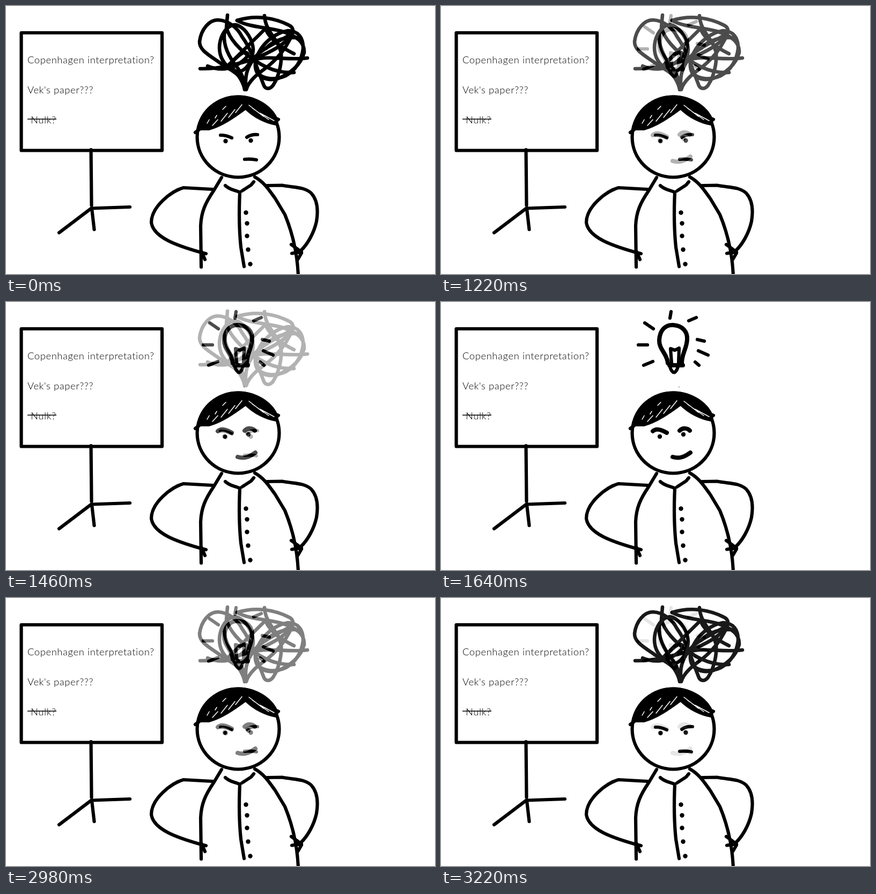
Animation of 800 by 500 pixels, one loop 3.28 s. Source, as an HTML page:

```html
<!DOCTYPE html>
<html lang="en">
<head>
<meta charset="utf-8">
<title>Bright idea</title>
<style>
  html, body { margin: 0; width: 100%; height: 100%; overflow: hidden; background: #fff; }
  svg { display: block; width: 800px; height: 500px; }
  .ink { fill: none; stroke: #000; stroke-width: 6.2; stroke-linecap: round; stroke-linejoin: round; }
  .bold { stroke-width: 8; }
  .tangle { stroke-width: 6.6; }
  .dots { fill: #000; stroke: none; }
  .gaps { stroke: #fff; stroke-width: 1.5; }
  text { font: 300 18.4px Lato, "Open Sans", sans-serif; letter-spacing: .6px; }

  /* ten 60 ms steps each way, with long holds between */
  #idea { animation: fade 3280ms infinite; }
  @keyframes fade {
    0% { opacity: 0; }
    31.7% { opacity: 0; animation-timing-function: steps(10, end); }
    50% { opacity: 1; }
    81.7% { opacity: 1; animation-timing-function: steps(10, end); }
    100% { opacity: 0; }
  }
</style>
</head>
<body>
<svg viewBox="0 0 800 500">
  <g id="worry" class="ink">
    <g class="tangle">
      <path d="M446 155C443 132 425 122 406 111C382 93 360 84 361 66C364 43 379 26 395 26C417 27 433 43 440 57C451 72 457 86 462 99"/>
      <path d="M434 37C423 31 411 40 404 53C396 69 396 87 404 101C411 113 424 124 437 122C452 117 460 98 461 81C460 63 448 44 434 37C421 33 409 39 407 53C405 78 419 100 433 117C441 129 446 142 447 155"/>
      <path d="M413 17L411 40C416 60 435 82 462 100"/>
      <path d="M362 117C398 118 433 108 462 99C491 87 522 72 534 51C537 42 533 38 526 35C500 22 465 16 431 27"/>
      <path d="M376 112C397 121 421 119 438 105C451 96 456 87 444 86C433 91 424 103 414 111L487 39"/>
      <path d="M431 27C453 40 492 40 517 48C544 57 557 68 556 87C550 110 530 126 508 135C483 142 463 130 465 107C469 80 493 52 526 46C545 46 555 60 554 80C551 104 539 120 522 130C502 139 479 137 468 124"/>
      <path d="M482 18C484 49 507 60 513 87C515 112 506 136 498 148C492 156 483 156 480 146C473 128 467 112 462 98C478 78 507 68 534 51"/>
      <path d="M485 79C499 63 524 56 550 60M562 97C528 102 493 92 462 100C480 113 505 126 537 124"/>
      <path d="M425 119C436 132 443 143 445 156H448C453 138 472 125 488 113C505 99 523 79 534 52"/>
      <path d="M447 153C446 132 448 117 462 99M484 43C492 62 514 78 537 89"/>
    </g>
    <path d="M400 241Q411 241 421 246M449 245Q457 239 469 240M445 286Q455 285 467 287"/>
    <g class="dots"><circle cx="409.5" cy="252" r="4.2"/><circle cx="456.5" cy="251" r="4.2"/></g>
  </g>

  <g id="idea" class="ink">
    <path d="M350 8H570V300H350Z" fill="#fff" stroke="none"/>
    <path class="bold" d="M423 114C422 97 406 88 407 71C408 52 419 42 433 43C450 44 460 55 459 70C458 88 449 96 449 114M426 118H451"/>
    <path d="M430 114L428 87L436 90L444 86L443 114M427 121Q430 131 435 131.5Q439 130 442 121"/>
    <path d="M429 18L427 30M462 35L476 29M380 39L396 50M368 80H385M378 118L395 111M478 70L491 73M480 91L498 99M474 112L481 118"/>
    <path class="bold" d="M395 241C401 235 411 238 421 244M445 240C451 234 460 235 464 240M432 289C444 293 454 289 465 281"/>
    <g class="dots">
      <circle cx="408" cy="251" r="4.2"/><circle cx="452" cy="247" r="4.2"/>
      <circle cx="444" cy="158.5" r="1" fill="#888"/>
    </g>
  </g>

  <g id="board" class="ink">
    <path d="M28.5 50H291V269.500H28.5Z"/>
    <path d="M158.5 268L159.5 372M231 375L159 377.5L99 423M160 378L164.5 417"/>
  </g>
  <text x="40" y="107">Copenhagen interpretation?</text>
  <text x="40" y="163">Vek's paper???</text>
  <text x="46" y="219">Nulk?</text>
  <path d="M40 211H94" stroke="#000" stroke-width="1.3"/>

  <g id="man" class="ink">
    <ellipse cx="433" cy="244.5" rx="76.5" ry="75"/>
    <path fill="#000" d="M359 229C364 198 392 170 433 169.5C470 170 497 192 505 214L504 220C486 217 464 207 447 190C424 207 401 223 378 229Z"/>
    <path d="M353 236L362 229M495 206L508 211.5"/>
    <path class="gaps" d="M375 219L379 212M385 223L395 212M401 215L413 200M415 208L427 193M404 193L410 187M428 199L440 184M390 209L393 204M453 185L480 206M460 191L490 212M474 200L500 214"/>

    <path d="M385 342L331 339C309 345 271 374 271 404C275 432 319 447 361 459L373 462M364 457L371 473"/>
    <path d="M402 320L387 345C372 367 364 384 363 410L364 487"/>
    <path d="M409 335C417 343 426 343 435 347M440 345L457 334L462 328"/>
    <path d="M436 347C434 390 435 421 438 450L444 486"/>
    <path d="M464 319C482 329 491 344 502 359L520 389C535 425 543 460 545 502"/>
    <path d="M487 335L515 334.5C537 339 556 337 569 349C582 363 582 384 579 402C574 425 561 446 550 456"/>
    <path d="M532 445L551 459L533 461.5M551 461L544 473"/>
    <g class="dots">
      <circle cx="447.5" cy="385.5" r="4.2"/><circle cx="449.5" cy="405.5" r="4.2"/>
      <circle cx="449.5" cy="429" r="4.2"/><circle cx="451.5" cy="454.5" r="4.2"/>
      <circle cx="455.5" cy="481.5" r="4.2"/>
    </g>
  </g>
</svg>
</body>
</html>
```
